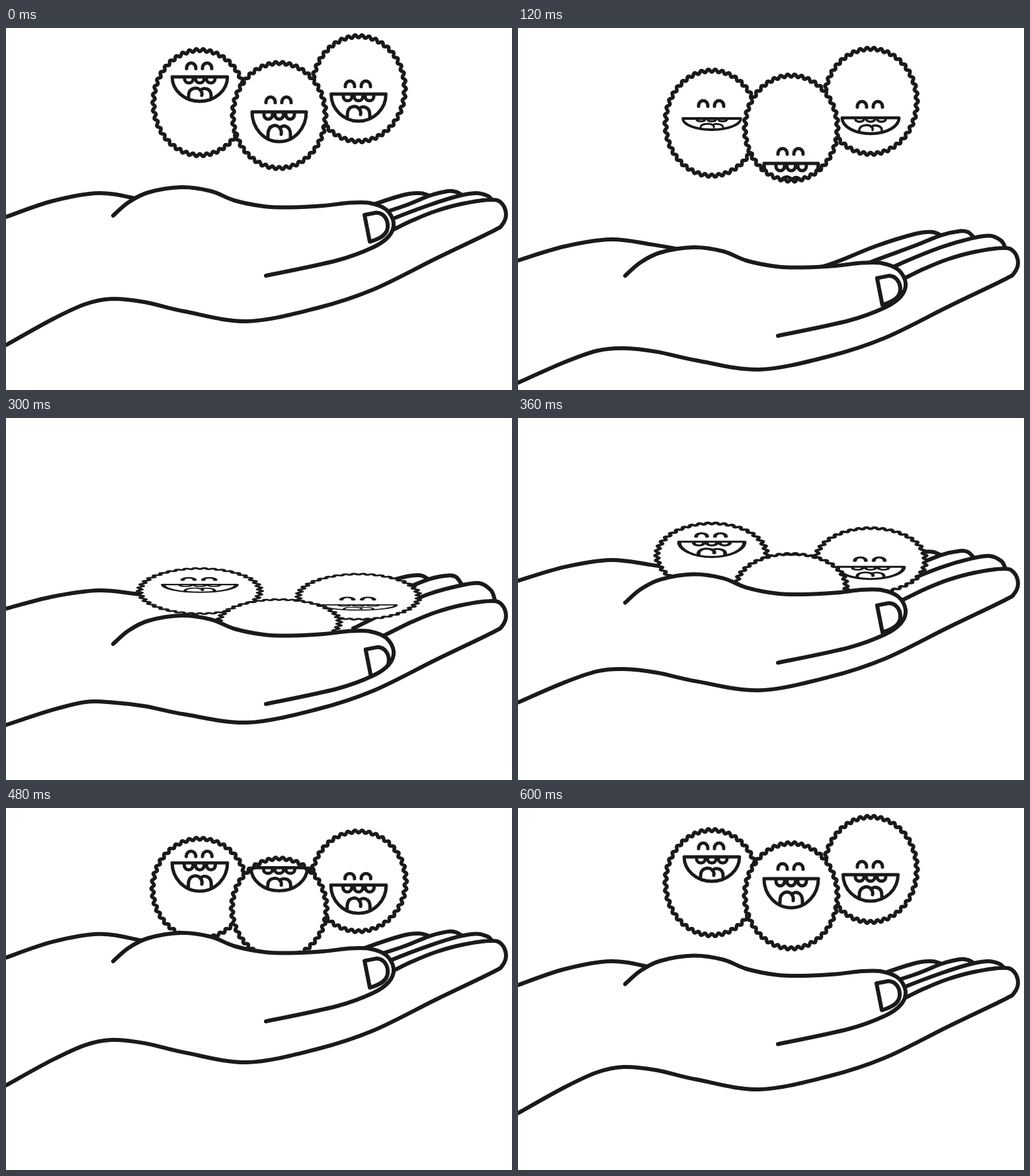
An HTML page with a canvas for the animation above (630 ms loop, 765 px wide and 548 px high).

```html
<!DOCTYPE html>
<html lang="en">
<head>
<meta charset="utf-8">
<title>Bouncing in the hand</title>
<style>
  html, body { margin: 0; width: 100%; height: 100%; overflow: hidden; background: #fff; }
  canvas { display: block; }
</style>
</head>
<body>
<canvas id="stage" width="765" height="548"></canvas>
<script>
const ctx = document.getElementById('stage').getContext('2d');
const INK = '#1b191a';
const STEP_MS = 30, STEPS = 21;
const KEYS = [0, 4, 7, 10, 14, 16, 18, 20];

// Looping monotone cubic through one value per key; gain is added on every lap.
function track(values, gain = 0) {
  const n = KEYS.length;
  const lap = i => Math.floor(i / n);
  const time = i => KEYS[i - lap(i) * n] + STEPS * lap(i);
  const value = i => values[i - lap(i) * n] + gain * lap(i);
  const rate = i => (value(i + 1) - value(i)) / (time(i + 1) - time(i));
  const slope = i => {
    const before = rate(i - 1), after = rate(i);
    if (before * after <= 0) return 0;
    const h0 = time(i) - time(i - 1), h1 = time(i + 1) - time(i);
    return 3 * (h0 + h1) / ((2 * h1 + h0) / before + (h1 + 2 * h0) / after);
  };
  return t => {
    let i = 0;
    while (i < n - 1 && KEYS[i + 1] <= t) i++;
    const h = time(i + 1) - time(i), u = (t - time(i)) / h, v = 1 - u;
    return value(i) * v * v * (1 + 2 * u) + slope(i) * h * u * v * v
         + value(i + 1) * u * u * (3 - 2 * u) - slope(i + 1) * h * u * u * v;
  };
}

const handY = track([0, 73, 99, 17, -58.5, -59, -46, -18]);
const thumbY = track([0, 91, 135, 58, -46, -52, -43, -17.5]);
const openness = track([0, 0.42, 1, 0.85, 0.1, 0.03, 0, 0]);
const stretchX = track([1, 1, 1, 1.3, 1.05, 1.02, 1, 1]);
const stretchY = track([1, 1, 1, 0.43, 0.86, 0.95, 0.985, 1]);

const balls = [
  { x: 293, brow: 20,
    y: track([113, 144, 207, 262, 141, 122, 114, 113]),
    face: track([-39, -7, 11, -23, -40, -41, -41, -39]),
    mouth: track([38, 18, 11, 28, 45, 46, 45, 38]) },
  { x: 533, brow: 20,
    y: track([92, 111, 160.5, 270.5, 141, 111, 98, 93]),
    face: track([8, 25, 62.5, 29, 8, 6, 6, 8]),
    mouth: track([42, 25, 10, 19, 42, 46, 46, 41]) },
  { x: 413, brow: 24,
    y: track([132.5, 151.5, 201, 309, 181, 152, 137.5, 133]),
    face: track([-5.5, 53.5, 115, 160, 216, 235, 255, 274], 300),
    mouth: track([46, 46, 46, 36, 33, 38, 43, 45]) }
];

// Points are x, y, then the shift in y and in x when the hand is fully open.
const backOfHand = [
  [0, 286, -17], [70, 262, -10], [140, 250, -7], [200, 259, -11], [265, 276, -23], [330, 295, -29],
  [390, 310, -35], [460, 305, -40], [540, 273, -37], [600, 253, -34], [625, 250, -34], [638, 253, -31]
];
const ringFinger = [
  [468, 318, -24], [530, 293, -25], [600, 270, -32], [640, 254, -32], [668, 247, -30],
  [680, 248, -29], [688, 252, -22]
];
const middleFinger = [
  [525, 316, -17], [582, 290, -19], [640, 268, -22], [685, 254, -20], [712, 250, -20, 4],
  [728, 254, -12, 6], [733, 258, 0, 7]
];
const indexAndEdge = [
  [570, 313], [588, 304], [615, 291], [650, 277], [690, 266], [735, 260], [750, 266], [756, 282],
  [750, 298], [735, 308], [650, 349], [555, 396], [470, 424], [365, 444], [270, 429, 3],
  [210, 415, 5], [160, 410, 4], [120, 418, -6], [70, 441, -19], [0, 480, -38]
];
const thumb = [
  [162, 284], [185, 264], [215, 249], [265, 241], [310, 247], [345, 261], [390, 270], [430, 271.5],
  [480, 269], [520, 264.5], [550, 265], [575, 275], [586, 295], [579, 315], [555, 332], [500, 352],
  [393, 375]
];

function spline(points, open = 0) {
  const p = points.map(([x, y, dy = 0, dx = 0]) => [x + dx * open, y + dy * open]);
  const path = new Path2D();
  path.moveTo(...p[0]);
  for (let i = 0; i < p.length - 1; i++) {
    const a = p[i - 1] || p[i], b = p[i], c = p[i + 1], d = p[i + 2] || c;
    path.bezierCurveTo(
      b[0] + (c[0] - a[0]) / 6, b[1] + (c[1] - a[1]) / 6,
      c[0] - (d[0] - b[0]) / 6, c[1] - (d[1] - b[1]) / 6, c[0], c[1]);
  }
  return path;
}

function scallopedEdge() {
  const path = new Path2D(), bumps = 42, count = bumps * 8;
  for (let i = 0; i < count; i++) {
    const a = i / count * 2 * Math.PI, wave = 2.1 * Math.cos(bumps * a);
    path.lineTo((70 + wave) * Math.cos(a), (79.5 + wave) * Math.sin(a));
  }
  path.closePath();
  return path;
}
const edge = scallopedEdge();
const thumbPath = spline(thumb);

function drawHandBack(t) {
  const open = openness(t);
  ctx.save();
  ctx.translate(0, handY(t));
  for (const line of [backOfHand, ringFinger, middleFinger, indexAndEdge]) ctx.stroke(spline(line, open));
  ctx.restore();
}

function drawThumb(t) {
  const open = openness(t);
  ctx.save();
  ctx.translate(0, thumbY(t));
  ctx.fill(thumbPath);
  ctx.save();
  ctx.clip(thumbPath);
  ctx.translate(2 * open, 11 * open);
  ctx.stroke(new Path2D('M542 283L560 279.5C572 280 578 291 577 302C576 313 566 319 550 323.5Z'));
  ctx.restore();
  ctx.stroke(thumbPath);
  ctx.restore();
}

function drawEyes(top) {
  for (const x of [-13, 11]) {
    ctx.beginPath();
    ctx.moveTo(x - 7, top + 10);
    ctx.ellipse(x, top + 9, 7, 7.5, 0, Math.PI, 2 * Math.PI);
    ctx.lineTo(x + 7, top + 10);
    ctx.stroke();
  }
}

function drawMouth(height) {
  const k = height / 46, half = 41 + (46 - height) * 0.1;
  const mouth = new Path2D();
  mouth.ellipse(0, 0, half, height - 1, 0, 0, Math.PI);
  mouth.closePath();

  const inside = new Path2D();
  for (const x of [-16.5, 0, 16.5]) {
    inside.moveTo(x - 6.5, 0);
    inside.lineTo(x - 6.5, 4 * k);
    inside.ellipse(x, 4 * k, 6.5, 7 * k, 0, Math.PI, 0, true);
    inside.lineTo(x + 6.5, 0);
  }
  const tongue = new Path2D('M-17 44V35C-17 18 -2 18 1 25C5 18 17 21 17 34V44M1 25Q4 28 3 34');
  inside.addPath(tongue, new DOMMatrix([1, 0, 0, k, 0, 0]));

  ctx.save();
  ctx.clip(mouth);
  ctx.lineWidth = 5 * Math.max(0.6, Math.min(1, k + 0.15));
  ctx.stroke(inside);
  ctx.restore();
  ctx.lineWidth = 5 * Math.max(0.75, Math.min(1, k + 0.4));
  ctx.stroke(mouth);
}

function drawBall(ball, t) {
  const turn = ball.face(t), face = turn > 150 ? turn - 300 : turn;
  const height = ball.mouth(t);
  ctx.save();
  ctx.translate(ball.x, ball.y(t));
  ctx.scale(stretchX(t), stretchY(t));
  ctx.fill(edge);
  ctx.save();
  ctx.clip(edge);
  ctx.lineWidth = 5;
  ctx.translate(0, face);
  drawEyes(-ball.brow - (46 - height) * 0.3);
  drawMouth(height);
  ctx.restore();
  ctx.lineWidth = 5.4;
  ctx.stroke(edge);
  ctx.restore();
}

function draw(t) {
  ctx.fillStyle = '#fff';
  ctx.fillRect(0, 0, 765, 548);
  ctx.strokeStyle = INK;
  ctx.lineWidth = 6;
  ctx.lineCap = ctx.lineJoin = 'round';
  drawHandBack(t);
  for (const ball of balls) drawBall(ball, t);
  drawThumb(t);
}

const start = performance.now();
function tick() {
  draw(Math.floor((performance.now() - start) / STEP_MS) % STEPS);
  requestAnimationFrame(tick);
}
tick();
</script>
</body>
</html>
```
